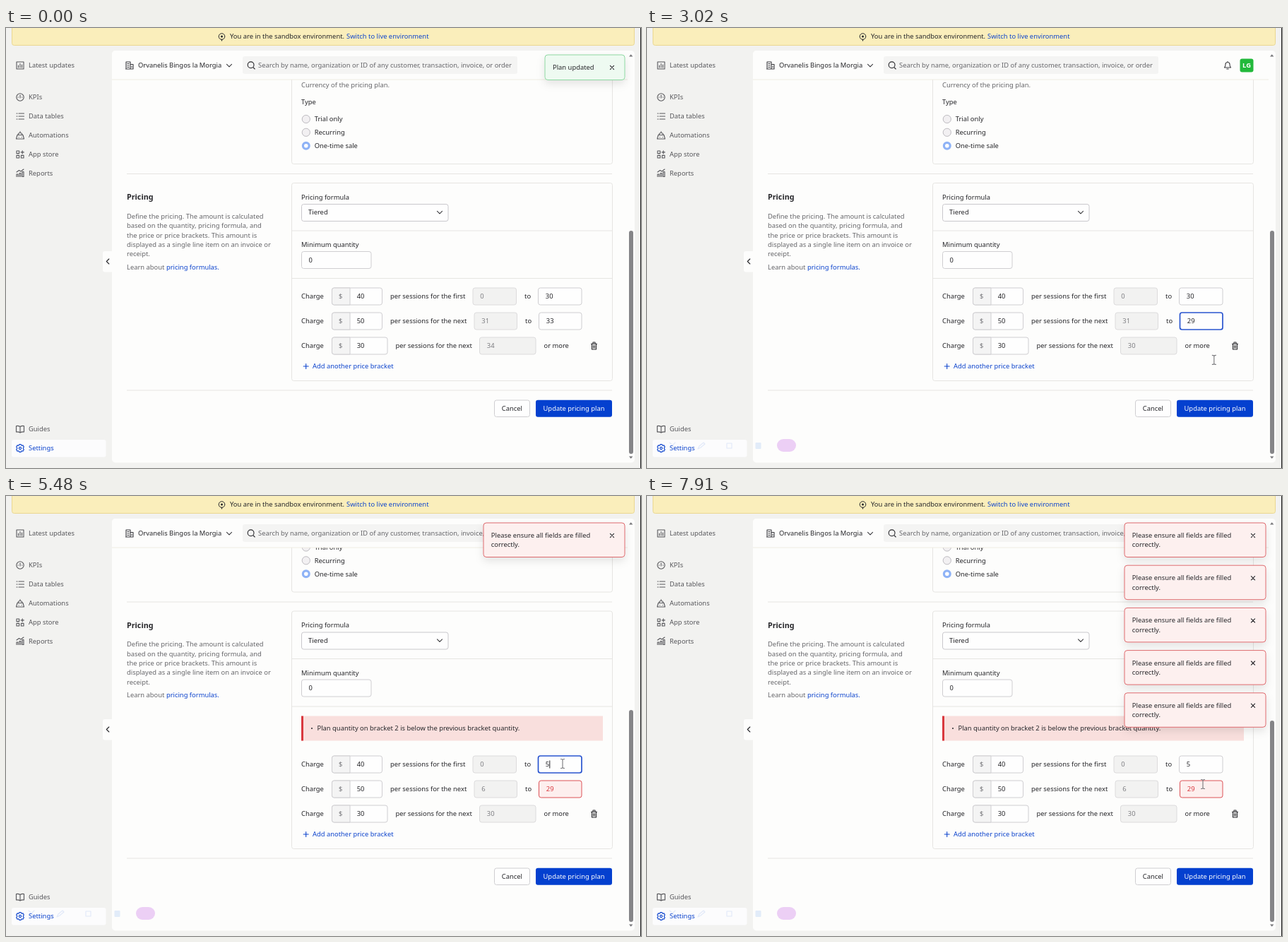
Write an HTML page that moves like this. It is 899 px wide and 623 px high and loops after 8000 ms.

```html
<!DOCTYPE html>
<html lang="en">
<head>
<meta charset="utf-8">
<title>Pricing plan</title>
<style>
html, body { margin: 0; width: 100%; height: 100%; overflow: hidden; background: #f2f2f0; }
svg { display: block; width: 100vw; height: 100vh; fill: #26262a; font: 9.38px "Noto Sans", "Open Sans", sans-serif; }
text { white-space: pre; }
</style>
</head>
<body>
<svg id="stage" viewBox="0 0 899 623"></svg>
<script>
const LOOP = 8000, ALERT = 56.5;
const BLUE = '#0d44cd', INK = '#26262a', GREY = '#66666a', LINE = '#e6e5e2', RED = '#d9383e';

// Markup helpers; text is placed by the middle of its line box.
const text = (x, y, s, extra = '') => `<text x="${x}" y="${y + 3.2}" ${extra}>${s}</text>`;
const rect = (x, y, w, h, fill, stroke = 'none', r = 3, extra = '') =>
  `<rect x="${x}" y="${y}" width="${w}" height="${h}" rx="${r}" fill="${fill}" stroke="${stroke}" ${extra}/>`;
const path = (d, stroke = '#3a3a3e', extra = '') =>
  `<path d="${d}" fill="none" stroke="${stroke}" stroke-width="1.1" stroke-linecap="round" stroke-linejoin="round" ${extra}/>`;
const rule = (x1, x2, y, c = LINE) => `<path d="M${x1} ${y}H${x2}" stroke="${c}"/>`;
const at = (x, y, body, id = '') => `<g ${id && `id="${id}"`} transform="translate(${x} ${y})">${body}</g>`;
const fill = c => `fill="${c}"`;
const cross = (x, y) => path(`M${x - 2.6} ${y - 2.6}l5.2 5.2m0 -5.2l-5.2 5.2`, INK);

const icons = {
  chart: 'M-5 -5H5V5H-5ZM-2.5 3V0M0 3V-2.5M2.5 3V-1',
  gauge: 'M-5.2 0a5.2 5.2 0 1 0 10.4 0a5.2 5.2 0 1 0 -10.4 0M0 1V-3M-3 0h.5M2.5 0h.5',
  list: 'M-5 -4h1M-2 -4H5.5M-5 0h1M-2 0H5.5M-5 4h1M-2 4H5.5',
  robot: 'M-4 -0.5H4L5.5 5H-5.5ZM-3 -0.5a3 3 0 0 1 6 0M0 -3.5V-5.5M-2 2.5h.3M2 2.5h.3',
  apps: 'M-5 -5h3.6v3.6h-3.6ZM-5 1.4h3.6V5h-3.6ZM1.4 1.4H5V5H1.4ZM3.2 -5.2V-1M1.1 -3.1H5.3',
  report: 'M-5 5V1.5h2V5M-1 5V0h2V5M3 5V-2h2V5ZM-5 -1.5L-1.5 -4L1 -2.5L5 -5.5',
  book: 'M0 -3.5Q-2 -5 -5.5 -4.5V4Q-2 3.5 0 5Q2 3.5 5.5 4V-4.5Q2 -5 0 -3.5V5',
  gear: 'M-1.3 -5.4h2.6l.7 1.7l2 -.4l1.4 2.3l-1.2 1.4v.8l1.2 1.4l-1.4 2.3l-2 -.4l-.7 1.7h-2.6l-.7 -1.7l-2 .4l-1.4 -2.3l1.2 -1.4v-.8l-1.2 -1.4l1.4 -2.3l2 .4ZM-1.6 0a1.6 1.6 0 1 0 3.2 0a1.6 1.6 0 1 0 -3.2 0',
  building: 'M-5 5V-5H1V5M1 -1.5H5V5H-5.5M-3 -2.5H-1M-3 0H-1M-3 2.5H-1M3 1.5v1',
  bell: 'M-4.5 3Q-3 1.5 -3 -1.5a3 3 0 0 1 6 0Q3 1.5 4.5 3ZM-1.2 5H1.2M0 -4.5V-5.5',
  trash: 'M-4 -2.8H4M-3 -2.8V5H3V-2.8M-1.5 -3V-5H1.5V-3M-1 -0.5V3M1 -0.5V3',
  down: 'M-3.5 -1.7L0 1.8L3.5 -1.7'
};
const icon = (name, x, y, c) => at(x, y, path(icons[name], c));

const banner = rect(8.5, -6, 881, 30.5, '#faeebb', '#ead791') +
  `<circle cx="305.5" cy="12" r="4.3" fill="none" stroke="${INK}"/><circle cx="305.5" cy="12" r="1.5" fill="${INK}"/>` +
  path('M305.5 16.3V18', INK) +
  text(317, 12, 'You are in the sandbox environment.') +
  text(482, 12, 'Switch to live environment', fill(BLUE));

const nav = [
  ['chart', 53, 'Latest updates'], ['gauge', 98, 'KPIs'], ['list', 125, 'Data tables'],
  ['robot', 152, 'Automations'], ['apps', 179, 'App store'], ['report', 205.5, 'Reports'],
  ['book', 568, 'Guides'], ['gear', 595, 'Settings', BLUE]
].map(([name, y, label, c = '#57575b']) => icon(name, 20, y, c) + text(32, y, label, fill(c))).join('');

const header = rect(150, 32, 730, 41, '#fdfdfc', 'none', 5) + rule(150, 880, 73, '#efece2') +
  icon('building', 175, 53) + text(187, 53, 'Orvanelis Bingos la Morgia') + icon('down', 316, 53) +
  rect(335, 40, 389, 25, '#f4f4f3') +
  `<circle cx="346.6" cy="52.3" r="4.4" fill="none" stroke="${INK}" stroke-width="1.1"/>` + path('M350 55.8l2.2 2.2', INK) +
  text(357, 53, 'Search by name, organization or ID of any customer, transaction, invoice, or order', fill(GREY)) +
  icon('bell', 822, 53) + rect(839.5, 43.5, 19, 19, '#22b93b') +
  text(849, 53, 'LG', 'text-anchor="middle" font-weight="700" fill="#fff"');

const radio = (y, label, on) =>
  `<circle cx="424.8" cy="${y}" r="${on ? 4.4 : 5.6}" fill="${on ? '#fff' : '#f2f0f2'}" stroke="${on ? '#8fb3f6' : '#bdbbc0'}" stroke-width="${on ? 3.2 : 1}"/>` +
  text(436.7, y, label);

const about = ['Define the pricing. The amount is calculated', 'based on the quantity, pricing formula, and',
  'the price or price brackets. This amount is', 'displayed as a single line item on an invoice or', 'receipt.'];

const upper = rect(404.5, -40, 454, 232.5, 'none', LINE) +
  text(418, 81, 'Currency of the pricing plan.', fill(GREY)) + text(418, 105, 'Type') +
  radio(129, 'Trial only') + radio(147.8, 'Recurring') + radio(166.8, 'One-time sale', true) +
  rule(171, 858, 206.5) +
  text(171, 240, 'Pricing', 'font-size="10.72" font-weight="700"') +
  about.map((s, i) => text(171, 266.5 + i * 13.4, s, fill(GREY))).join('') +
  text(171, 338.7, 'Learn about <tspan fill="' + BLUE + '">pricing formulas.</tspan>', fill(GREY)) +
  text(418, 239.7, 'Pricing formula') + rect(418.5, 249.5, 207.5, 24, '#fefefe', '#c9c8cc') +
  text(428, 261, 'Tiered') + icon('down', 614, 261) + rule(405, 858, 287) +
  text(418, 307, 'Minimum quantity') + rect(418.5, 316.5, 98.5, 24, '#fefefe', '#cfced1') +
  text(428.5, 328.5, '0') + rule(405, 858, 354.5) +
  `<g id="alert">${rect(418, 368, 427, 35, '#f9dfdd', 'none', 0)}${rect(418, 368, 3, 35, RED, 'none', 0)}
   <circle cx="433" cy="385.5" r="1" fill="${INK}"/>${text(440.5, 385.5, 'Plan quantity on bracket 2 is below the previous bracket quantity.')}</g>`;

const bracket = (y, n, price, priceW, label, fromX, fromW, tail) =>
  text(418, y, 'Charge') + rect(461.5, y - 12, priceW, 24, '#fefefe', '#cfced1') +
  `<path d="M464.5 ${y - 12}h22.5v24h-22.5a3 3 0 0 1 -3 -3v-18a3 3 0 0 1 3 -3" fill="#f4f4f4" stroke="#cfced1"/>` +
  text(473.8, y, '$', 'text-anchor="middle" ' + fill('#77777b')) + text(496.7, y, price) +
  text(551.5 - (n < 3 ? 7.5 : 0), y, 'per sessions for the ' + label) +
  rect(fromX, y - 12, fromW, 24, '#f2f2f1', '#dcdbdc') + text(fromX + 10.3, y, '', `id="from${n}" ` + fill('#7e7e82')) + tail;

const limit = (x, y, w, n) => text(x - 19.5, y, 'to') + rect(x, y - 12, w, 24, '#fefefe', '#cfced1', 3, `id="box${n}"`) +
  rect(x + 10, y - 6.5, 0, 13, '#cfdcf3', 'none', 0, `id="sel${n}"`) + text(x + 10.3, y, '', `id="to${n}"`) +
  `<path id="caret${n}" d="M${x + 16.3} ${y - 5.5}v11" stroke="${INK}"/>`;

const lower = bracket(380, 1, 40, 71, 'first', 661, 61.5, limit(753.5, 380, 61.5, 1)) +
  bracket(415, 2, 50, 71, 'next', 663, 60.5, limit(754.5, 415, 60.5, 2)) +
  bracket(450, 3, 30, 78.5, 'next', 670.5, 79.5, text(761.5, 450, 'or more') + icon('trash', 832.5, 450, INK)) +
  path('M421.2 479h7M424.7 475.5v7', BLUE) + text(434, 479, 'Add another price bracket', fill(BLUE)) +
  rule(171, 858, 513) + rect(691.5, 527, 50, 23.5, '#fefefe', '#cfced1') + text(716.4, 538.7, 'Cancel', 'text-anchor="middle"') +
  rect(750, 526.7, 108, 24, '#0440cf', 'none', 3, 'id="submit"') +
  text(804, 538.7, 'Update pricing plan', 'text-anchor="middle" fill="#fff"');

const recorder = `<g id="recorder"><g opacity=".22">${path('M32 587l8 8m0 -8l-8 8M72 596l2 -4l6 -5l2 2l-6 5ZM113 588h7v7h-7Z', '#7fa6e6')}</g>` +
  `<g opacity=".4">${rect(153.5, 587, 8, 9, '#b9d3f4', 'none', 1)}</g>${rect(184, 582, 27, 18, '#eccff5', 'none', 9)}</g>`;

const toastStarts = [3245, 5960, 6275, 6581, 6900];
const toasts = toastStarts.map((_, i) => {
  const y = 38 + i * 60.2;
  return `<g id="toast${i}">` + rect(676, y, 200, 48.5, '#fdf0ef', '#dd6a6e', 4, 'filter="url(#shadow)"') +
    text(686.8, y + 17.8, 'Please ensure all fields are filled') + text(686.8, y + 31.2, 'correctly.') + cross(858, y + 18) + '</g>';
}).join('');
const success = '<g id="success">' + rect(763, 38, 113, 35.5, '#eefaf1', '#8ed8a2', 4, 'filter="url(#shadow)"') +
  text(774, 55.7, 'Plan updated') + cross(858, 56) + '</g>';

const pointers = {
  arrow: '<path d="M-3 -5V5.5L-.6 3.3L1 6.8L2.6 6L1.1 2.8L4.3 2.5Z" fill="#222" stroke="#fff" stroke-width=".8"/>',
  beam: path('M-2.5 -6.5Q0 -6.5 0 -5Q0 -6.5 2.5 -6.5M0 -5.5V5.5M-2.5 6.5Q0 6.5 0 5Q0 6.5 2.5 6.5', '#77777b'),
  hand: '<path d="M-2 1V-4.6a1 1 0 0 1 2 0V-1.5L4 -.7Q5.3 -.3 5 1.5L4 5.7H-1.5L-4.7 1.6Q-4.6 0 -3.2 .4Z" fill="#fff" stroke="#222" stroke-linejoin="round"/>'
};

const stage = document.getElementById('stage');
stage.innerHTML = `<defs>
  <filter id="shadow" x="-20%" y="-40%" width="140%" height="220%"><feDropShadow dx="0" dy="5" stdDeviation="6" flood-color="#000" flood-opacity=".1"/></filter>
  <clipPath id="view"><rect x="150" y="73" width="730" height="542"/></clipPath></defs>` +
  rect(0, 0, 899, 623, '#f2f2f0', 'none', 0) + banner +
  rect(150, 32, 740, 583.5, '#fdfdfc', 'none', 5) + rect(137, 316, 16, 29.5, '#fdfdfc') + path('M145.8 327l-3.5 3.5l3.5 3.5', INK) +
  rect(8, 583, 133.5, 24.5, '#fcfcfd') + nav +
  `<g clip-path="url(#view)"><g id="upper">${upper}</g>${rect(404.5, 219.5, 454, 280, 'none', LINE, 3, 'id="card"')}<g id="lower">${lower}</g></g>` +
  header + '<path d="M882 40.5l2.7 -3.2l2.7 3.2ZM882 606.5l2.7 3.2l2.7 -3.2Z" fill="#77777a"/>' +
  rect(882, 287, 6, 316, '#858588', 'none', 3, 'id="thumb"') + recorder + success + toasts +
  Object.keys(pointers).map(k => at(0, 0, pointers[k], k)).join('') + rect(898, 0, 1, 623, '#1c1c1e', 'none', 0);

const $ = {};
stage.querySelectorAll('[id]').forEach(el => $[el.id] = el);
const set = (id, attrs) => { for (const k in attrs) $[id].setAttribute(k, attrs[k]); };
const show = (id, on) => set(id, { visibility: on ? 'visible' : 'hidden' });
const move = (id, x, y) => set(id, { transform: `translate(${x} ${y})` });

const clamp = x => Math.min(1, Math.max(0, x));
const span = (t, a, b) => clamp((t - a) / (b - a));
const smooth = x => x * x * (3 - 2 * x);
const easeOut = x => 1 - (1 - x) ** 3;
const during = (t, a, b) => t >= a && t < b;

// Toast overshoots on entry, then settles.
const bounce = [[0, 2010], [.6, -16.75], [.75, 6.7], [.9, -3.35], [1, 0]];
function bounceIn(p) {
  for (let i = 1; i < bounce.length; i++) {
    const [a, x0] = bounce[i - 1], [b, x1] = bounce[i];
    if (p <= b) return x0 + (x1 - x0) * easeOut(span(p, a, b));
  }
  return 0;
}

const trail = [
  [850, 826, 618, 'arrow'], [1200, 779, 414, 'beam'], [1300, 779, 414, 'beam'], [1550, 758, 413, 'beam'],
  [1750, 758, 413, 'beam'], [2200, 776, 418, 'beam'], [2930, 776, 418, 'beam'], [3130, 838, 538, 'hand'],
  [3490, 842, 540, 'hand'], [3540, 838, 532, 'arrow'], [3820, 772, 399, 'arrow'], [4150, 788, 379, 'beam'],
  [5500, 788, 379, 'beam'], [5860, 821, 532, 'hand'], [7250, 821, 532, 'hand'], [7400, 812, 495, 'arrow'], [7750, 787, 408, 'beam']
];
function drawPointer(t) {
  let i = trail.length - 1;
  while (i > 0 && t < trail[i][0]) i--;
  const a = trail[i], b = trail[i + 1] || a, p = smooth(span(t, a[0], b[0] + (a === b)));
  const kind = p > .85 ? b[3] : a[3];
  for (const k in pointers) show(k, k === kind && t >= trail[0][0]);
  move(kind, a[1] + (b[1] - a[1]) * p, a[2] + (b[2] - a[2]) * p);
}

function drawField(n, value, focus, selected, caret, error) {
  const ring = focus ? (error ? '#8d70bd' : '#2a55cf') : error ? '#dd5257' : '#cfced1';
  set('box' + n, { stroke: ring, 'stroke-width': focus ? 1.7 : 1, fill: error ? '#fdefee' : '#fefefe' });
  $['to' + n].textContent = value;
  set('to' + n, { fill: error ? RED : INK });
  const x = n === 1 ? 763.5 : 764.5;
  set('sel' + n, { x: x + 11 * (1 - selected), width: 11 * selected });
  show('caret' + n, caret);
  move('caret' + n, (value.length - 1) * 5.4, 0);
}

function draw(t) {
  const failed = t >= 3230;
  const down = failed ? ALERT * (1 - smooth(span(t, 3400, 3625))) : 0;
  const up = failed ? down - ALERT : 0;
  move('upper', 0, up);
  move('lower', 0, down);
  set('card', { y: 219.5 + up, height: 280 + down - up });
  show('alert', failed);
  const top = !failed ? 287 : during(t, 5070, 5510) ? 303 : 318 - down * .49;
  set('thumb', { y: top, height: !failed ? 316 : top === 303 ? 300 : 285 });

  const second = t < 2400 ? '33' : t < 2700 ? '2' : '29';
  $.from1.textContent = '0';
  $.from2.textContent = t < 4640 ? '31' : '6';
  $.from3.textContent = t < 2400 ? '34' : t < 2700 ? '3' : '30';
  drawField(1, t < 4640 ? '30' : '5', during(t, 4170, 5860), during(t, 4300, 4640) ? 1 : 0,
    during(t, 4640, 5070) || during(t, 5480, 5860), false);
  drawField(2, second, during(t, 1220, 3640), t < 2400 ? smooth(span(t, 1300, 1550)) : 0, during(t, 2400, 2900), failed);
  set('submit', { fill: during(t, 3090, 3240) || during(t, 5820, 7290) ? '#0a35a3' : '#0440cf' });
  show('recorder', t >= 840);

  const out = span(t, 30, 730);
  const slide = out < .2 ? -13.4 * smooth(out / .2) : -13.4 + 1353 * smooth(span(out, .2, 1));
  move('success', slide, 0);
  set('success', { opacity: 1 - smooth(span(out, .2, 1)) });
  toastStarts.forEach((start, i) => {
    show('toast' + i, t >= start);
    move('toast' + i, bounceIn(span(t, start, start + 700)), 0);
  });
  drawPointer(t);
}

const begin = performance.now();
function tick() {
  draw((performance.now() - begin) % LOOP);
  requestAnimationFrame(tick);
}
tick();
</script>
</body>
</html>
```
